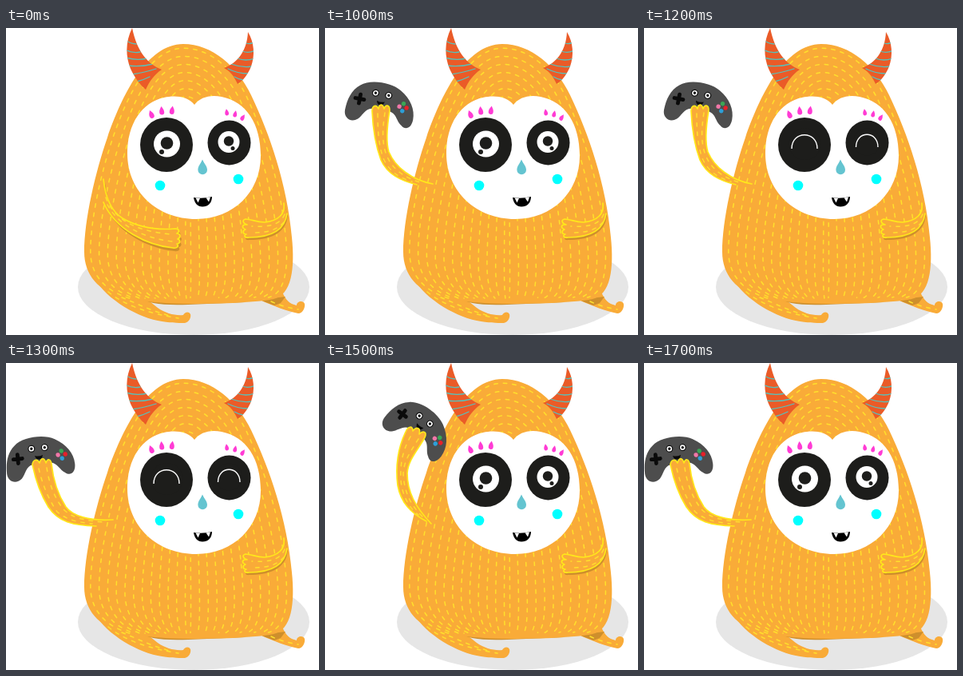
Animation, 392 px wide and 384 px high, one loop 2.2 s. Source, as an HTML page:

```html
<!DOCTYPE html>
<html lang="en">
<head>
<meta charset="utf-8">
<title>Monster with a gamepad</title>
<style>
html, body { margin: 0; width: 100%; height: 100%; overflow: hidden; background: #fff; }
svg { display: block; width: 100vw; height: 100vh; }
.fur { fill: #f9ab38; }
.shade { fill: #ce8f2c; }
.arm { fill: #f9ab38; stroke: #ffe81a; stroke-width: 1.7; stroke-linejoin: round; stroke-linecap: round; }
.hair { fill: none; stroke: #ffe02c; stroke-width: 1.5; stroke-linecap: round; stroke-dasharray: 4.5 7; }
.ink { fill: #1d1d1b; }
.white { fill: #fff; }
.stripes { fill: none; stroke: #55c3bd; stroke-width: 1.3; stroke-linecap: round; }

/* Hard pose changes on a 2.2 s loop */
.rest, .left, .mid, .far, .shut { animation: 2.2s step-end infinite; }
.rest { animation-name: rest; }
.left { animation-name: left; }
.mid { animation-name: mid; }
.far { animation-name: far; }
.shut { animation-name: shut; }
@keyframes rest { 0% { opacity: 1 } 22.727%, 100% { opacity: 0 } }
@keyframes left {
  0%, 45.454%, 63.636% { opacity: 0 }
  22.727%, 59.09%, 77.272%, 100% { opacity: 1 }
}
@keyframes mid {
  0%, 50%, 59.09%, 68.181%, 77.272%, 100% { opacity: 0 }
  45.454%, 54.545%, 63.636%, 72.727% { opacity: 1 }
}
@keyframes far {
  0%, 54.545%, 72.727%, 100% { opacity: 0 }
  50%, 68.181% { opacity: 1 }
}
@keyframes shut { 0%, 68.181%, 100% { opacity: 0 } 54.545% { opacity: 1 } }
</style>
</head>
<body>
<svg viewBox="0 0 392 384">
  <defs>
    <path id="arch" d="M150 340C115 330 98 308 98 280C98 240 112 180 127 137C145 85 176 20 222 20C258 20 290 48 307 84C330 132 352 195 358 262C362 300 358 334 335 339"/>
    <path id="hornL" d="M158 0C149 18 150 36 156 51C161 62 168 71 175 77C180 66 186 58 195 52C177 45 164 29 158 0Z"/>
    <path id="hornR" d="M303 5C311 18 312 34 307 48C303 58 297 66 290 70C286 61 281 54 273 50C290 44 302 28 303 5Z"/>
    <clipPath id="clipL"><use href="#hornL"/></clipPath>
    <clipPath id="clipR"><use href="#hornR"/></clipPath>
    <path id="petal" d="M0-5.5C2-2 3-1 3 2A3 3 0 0 1-3 2C-3-1-2-2 0-5.5Z"/>
    <g id="padEye">
      <circle r="4.5" fill="#111"/><circle r="3.3" class="white"/><circle r="1.7" fill="#111"/>
    </g>
    <g id="pad">
      <path fill="#4d4d4d" d="M-43 17C-43 4-40-9-30-17C-19-27 8-28 21-20C35-12 43 0 43 13C43 24 36 28 30 23C22 18 22 9 10 8L-10 9C-18 10-20 20-25 25C-33 32-43 27-43 17Z"/>
      <path stroke="#0a0a0a" stroke-width="4.8" stroke-linecap="round" d="M-33 0H-29.5M-25.5 0H-22M-27.5-5.5V-2M-27.5 2V5.5"/>
      <circle cx="27.6" cy="-4.5" r="2.7" fill="#3aa655"/>
      <circle cx="32.2" r="2.7" fill="#e8202a"/>
      <circle cx="23" r="2.7" fill="#f277a8"/>
      <circle cx="27.7" cy="4.8" r="2.7" fill="#2d9fd8"/>
      <use href="#padEye" x="-9.3" y="-11"/>
      <use href="#padEye" x="7.3" y="-11"/>
      <path fill="#0a0a0a" d="M-6-2Q-1 0 4-2Q3 3-1 3Q-5 3-6-2Z"/>
    </g>
    <path id="armR" d="M348 219C350 233 341 241 324 243C313 243 307 239 300 239C295 240 297 245 302 246C296 245 294 250 300 252C296 253 296 258 301 258C297 259 299 263 304 262C327 262 349 256 352 232"/>
    <path id="armRest" d="M122 189C124 208 130 228 146 238C165 249 188 253 212 251C217 251 218 255 214 257C219 257 219 262 215 264C219 265 218 270 214 270C217 273 214 276 209 275C178 272 137 253 122 218"/>
  </defs>

  <ellipse cx="235" cy="324" rx="145" ry="60" fill="#e6e6e6"/>

  <path class="fur" d="M108 308C120 335 160 360 190 366C205 369 215 369 224 369C230 368 232 361 231 358C229 354 224 355 222 359C212 360 200 357 190 350L165 330Z"/>
  <path class="fur" d="M318 340C335 348 352 354 366 357C372 357 375 349 374 345C372 340 364 342 364 347C355 345 350 340 346 330Z"/>
  <path class="shade" d="M163 336C178 345 196 347 228 346L300 343L220 338ZM318 340L336 347L344 344L350 336Z"/>
  <path class="fur" d="M150 338C115 330 98 308 98 280C98 240 112 180 127 137C145 85 176 20 222 20C258 20 290 48 307 84C330 132 352 195 358 262C362 300 358 334 335 339C310 344 260 345 228 345C200 345 170 342 150 338Z"/>
  <g id="coat" class="hair"></g>
  <path class="hair" d="M128 330C150 348 180 357 216 363M145 337C165 345 180 353 205 360M332 342C345 348 355 350 366 352"/>

  <use href="#hornL" fill="#ea5b28"/>
  <path class="stripes" clip-path="url(#clipL)" d="M150 15Q156 20 163 20M149 27Q158 32 168 30M150 37Q163 41 177 38M153 47Q169 49 184 45M158 58Q172 56 188 51M164 67Q172 65 180 61"/>
  <use href="#hornR" fill="#ea5b28"/>
  <path class="stripes" clip-path="url(#clipR)" d="M312 17Q306 21 301 19M312 28Q304 32 296 29M311 38Q300 42 290 38M308 48Q295 50 282 45M303 57Q290 57 278 51M297 65Q291 64 286 61"/>

  <path class="white" d="M236 96C227 85 211 84 198 87C170 93 152 120 152 157C152 205 190 239 238 239C285 239 319 205 319 160C319 120 301 92 270 86C255 83 243 87 236 96Z"/>
  <g fill="#ff3bd4">
    <use href="#petal" transform="translate(182 108) rotate(-22)"/>
    <use href="#petal" transform="translate(195 103.500) rotate(-6)"/>
    <use href="#petal" transform="translate(208 103) rotate(8)"/>
    <use href="#petal" transform="translate(276.500 105.500) rotate(-8) scale(.8)"/>
    <use href="#petal" transform="translate(287 107.500) rotate(12) scale(.8)"/>
    <use href="#petal" transform="translate(296.500 112) rotate(32) scale(.8)"/>
  </g>

  <ellipse class="ink" cx="201" cy="146" rx="33" ry="34"/>
  <ellipse class="ink" cx="279.500" cy="143.500" rx="27" ry="28"/>
  <circle class="white" cx="201.500" cy="145" r="16.500"/>
  <circle class="white" cx="279" cy="142.500" r="13.500"/>
  <g class="ink">
    <circle cx="201.500" cy="144" r="7.800"/><circle cx="195" cy="155" r="3"/>
    <circle cx="279" cy="141.500" r="6.200"/><circle cx="284" cy="150.500" r="2.500"/>
  </g>
  <g class="shut">
    <circle class="ink" cx="201.500" cy="145" r="20"/>
    <circle class="ink" cx="279" cy="142.500" r="17"/>
    <path fill="none" stroke="#fff" stroke-width="1.400" d="M185 151C185 128 217 128 217 151M265.500 149C265.500 128 293 128 293 149"/>
  </g>

  <path fill="#64c4d0" d="M246 164.500C249 171 252 173 252 177.500A5.800 5.800 0 0 1 240.400 177.500C240.400 173 243 171 246 164.500Z"/>
  <g fill="#0ff"><circle cx="193" cy="197" r="6.300"/><circle cx="291" cy="189" r="6.300"/></g>
  <path d="M235 212Q246 214 258 211C258 219 253 223.500 246 223.500C240 223.500 236 219 235 212Z"/>
  <path class="white" d="M237.500 212.500L243 213L240.500 218.500ZM250.500 212.500L256 211.500L254 217.500Z"/>

  <use href="#armR" class="shade" x="1" y="3"/>
  <use href="#armR" class="arm"/>
  <path class="hair" d="M349 233C343 247 328 249 308 248M348 243C338 254 325 256 308 256"/>

  <g class="rest">
    <use href="#armRest" class="shade" x="2" y="4"/>
    <use href="#armRest" class="arm"/>
    <path class="hair" d="M125 212C135 240 165 255 208 258M127 221C142 249 175 263 208 267"/>
  </g>

  <g class="left">
    <use href="#pad" transform="translate(42.200 117.300) rotate(-5.800)"/>
    <path class="arm" d="M134 196C104 198 83 191 75 180C66 166 59 146 57 126C56 120 52 119 50 125C48 118 44 118 42 125C39 119 34 121 33 127C37 146 43 164 53 180C66 199 83 203 113 204"/>
    <path class="hair" d="M51 131C54 151 61 170 73 184C83 193 96 197 122 199M41 132C46 153 53 170 64 186C76 196 88 199 108 201"/>
  </g>

  <g class="mid">
    <use href="#pad" transform="translate(70.500 93.800) rotate(11)"/>
    <path class="arm" d="M135 195C108 190 88 174 80 155C76 142 78 121 81 103C81 96 76 95 74 101C72 94 68 95 67 101C64 95 59 97 59 104C60 127 63 146 70 165C78 183 95 191 115 196"/>
    <path class="hair" d="M75 106C72 126 71 143 77 159C84 176 98 187 122 194M66 107C66 129 67 145 73 163C81 180 92 187 109 192"/>
  </g>

  <g class="far">
    <use href="#pad" transform="translate(119 80.500) rotate(36.900)"/>
    <path class="arm" d="M133 201C113 180 103 161 103 138C104 121 117 108 125 93C128 86 123 84 118 89C120 81 115 79 110 85C110 78 104 79 101 86C92 105 88 129 91 153C95 175 108 188 127 198"/>
    <path class="hair" d="M117 95C107 111 99 122 98 138C99 161 107 178 123 193M107 92C97 110 94 126 95 147C97 166 105 181 117 190"/>
  </g>
</svg>
<script>
// Nested arches of short hairs follow the outline of the body.
const coat = document.getElementById('coat');
for (let i = 0; i < 12; i++) {
  const inset = 0.06 + i * 0.083;
  const hair = document.getElementById('arch').cloneNode();
  hair.removeAttribute('id');
  hair.setAttribute('transform',
    `translate(228 338) scale(${1 - inset} ${1 - inset * 0.38}) translate(-228 -340)`);
  hair.setAttribute('vector-effect', 'non-scaling-stroke');
  hair.setAttribute('stroke-dashoffset', i * 5.3);
  coat.append(hair);
}
</script>
</body>
</html>
```
